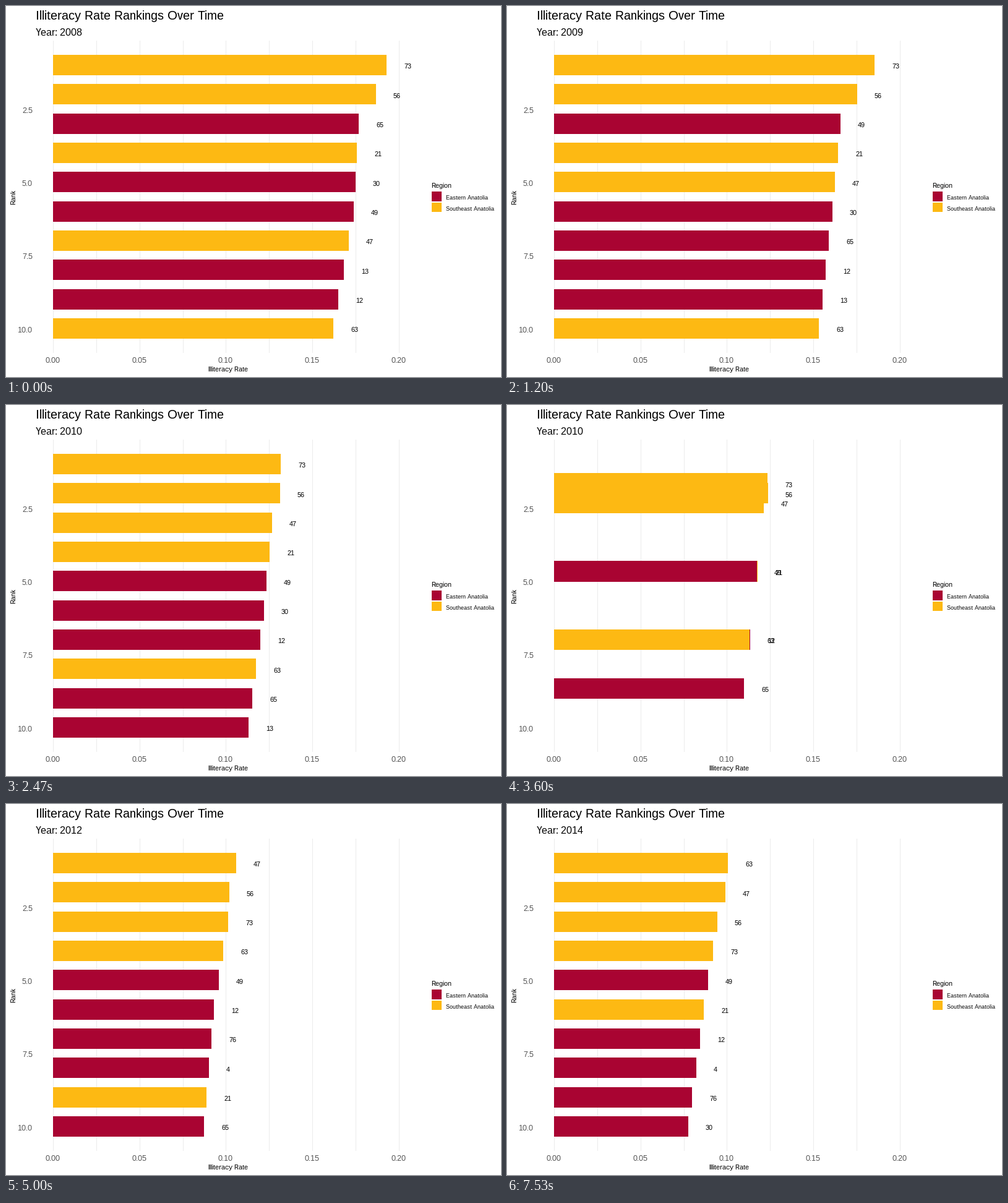
Write a matplotlib script that moves like this. It is 800 px wide and 600 px high and loops after 8000 ms.

```python
import matplotlib.pyplot as plt
import numpy as np
from matplotlib.animation import FuncAnimation
from matplotlib.patches import Rectangle

W, H, DPI = 800, 600, 100
plt.rcParams.update({
    "font.family": "Liberation Sans",
    "text.hinting": "native",
    "text.hinting_factor": 1,
})

RED, GOLD, GRID, GREY = "#A90432", "#FDB913", "#EBEBEB", "#4D4D4D"
SOUTHEAST = {2, 21, 47, 56, 63, 73}

FIRST_YEAR = 2008
START = [73, 56, 65, 21, 30, 49, 47, 13, 12, 63]
# Provinces that take a new rank each year; the rest make room for them
MOVES = [
    {},
    {49: 3, 65: 7, 47: 5, 12: 8},
    {47: 3, 49: 5, 12: 7, 63: 8},
    {47: 1, 56: 2, 49: 4, 63: 5, 12: 7, 65: 8, 2: 9, 4: 10},
    {63: 4, 12: 6, 76: 7, 4: 8},
    {4: 7, 30: 10},
    {63: 1, 21: 6},
]
# Bar ends in pixels at a few ranks; those between are interpolated
KEY_RANKS = (1, 2, 3, 6, 10)
KEY_ENDS = [
    (615, 598, 570, 562, 529),
    (594, 566, 539, 526, 504),
    (444, 443, 430, 417, 392),
    (386, 380, 374, 363, 340),
    (372, 361, 359, 336, 320),
    (360, 347, 344, 323, 302),
    (357, 353, 340, 318, 293),
]

X0, STEP_X = 76, 69.85        # zero line and spacing of the grid
Y1, STEP_Y = 95.5, 47.333     # centre of rank 1 and spacing of ranks
BAR_H = 0.7 * STEP_Y

FRAMES, INTERVAL = 400, 20
FPS, CYCLE, HOLD = 15, 19, 17  # motion advances in steps of 1/15 s


def yearly_states():
    """For each year, map province code to (rank, bar end)."""
    order, states = list(START), []
    for moves, ends in zip(MOVES, KEY_ENDS):
        for code, rank in moves.items():
            if code in order:
                order.remove(code)
            order.insert(rank - 1, code)
        order = order[:10]
        states.append({code: (rank, np.interp(rank, KEY_RANKS, ends))
                       for rank, code in enumerate(order, 1)})
    return states


STATES = yearly_states()

fig = plt.figure(figsize=(W / DPI, H / DPI), dpi=DPI, facecolor="white")
ax = fig.add_axes([0, 0, 1, 1])
ax.set_xlim(0, W)
ax.set_ylim(H, 0)
ax.axis("off")


def box(x0, y0, x1, y1, color, z=1):
    return ax.add_patch(Rectangle((x0, y0), x1 - x0, y1 - y0, facecolor=color,
                                  linewidth=0, antialiased=False, zorder=z))


def label(x, y, s, px, color="black", **kw):
    return ax.text(x, y, s, fontsize=px * 72 / DPI, color=color,
                   ha="left", va="baseline", zorder=5, **kw)


def row_y(rank):
    return Y1 + (rank - 1) * STEP_Y


# Grid and axes
for k in range(9):
    x = round(X0 + k * STEP_X)
    box(x, 56, x + 1, 561, GRID, z=0)
    if k % 2 == 0:
        label(round(X0 + k * STEP_X - 12), 577, f"{k * 0.025:.2f}", 12, GREY)
for rank in (2.5, 5, 7.5, 10):
    x = 19 if rank == 10 else 26
    label(x, round(row_y(rank) + 6.2), f"{rank:.1f}", 12, GREY)
label(327, 591, "Illiteracy Rate", 11)
label(15, 321, "Rank", 11, rotation=90, rotation_mode="anchor")

# Titles
label(48, 22, "Illiteracy Rate Rankings Over Time", 20)
subtitle = label(48, 48, "", 16)

# Legend
label(687, 294, "Region", 11)
box(688, 300, 704, 316, RED)
box(688, 318, 704, 333, GOLD)
label(711, 313, "Eastern Anatolia", 9)
label(711, 331, "Southeast Anatolia", 9)

# One bar and one label per province
bars, tags = {}, {}
for code in sorted(set().union(*STATES)):
    bars[code] = box(X0, 0, X0, 0, GOLD if code in SOUTHEAST else RED, z=2)
    tags[code] = label(0, 0, str(code), 11)


def place(code, rank, end):
    y = row_y(rank)
    top, bottom = round(y - BAR_H / 2), round(y + BAR_H / 2)
    bars[code].set_bounds(X0, top, round(end) - X0, bottom - top)
    tags[code].set_position((round(end + 28), round(y + 5.68)))


def update(frame):
    # Sample just past the middle of the frame, so steps fall on its start
    tick = (frame * INTERVAL + 14) * FPS // 1000
    i, step = divmod(tick + 1, CYCLE)
    t = max(0, step - HOLD + 1) / (CYCLE - HOLD + 1)
    now = STATES[i]
    after = STATES[i + 1] if t else now
    subtitle.set_text(f"Year: {FIRST_YEAR + i + (t > 0.5)}")
    for code in bars:
        # Provinces that enter or leave are hidden while the others move
        shown = code in now and code in after
        bars[code].set_visible(shown)
        tags[code].set_visible(shown)
        if shown:
            (r0, e0), (r1, e1) = now[code], after[code]
            place(code, r0 + (r1 - r0) * t, e0 + (e1 - e0) * t)
    return [subtitle, *bars.values(), *tags.values()]


anim = FuncAnimation(fig, update, frames=FRAMES, interval=INTERVAL,
                     repeat=True, repeat_delay=0, blit=False)
plt.show()
```
